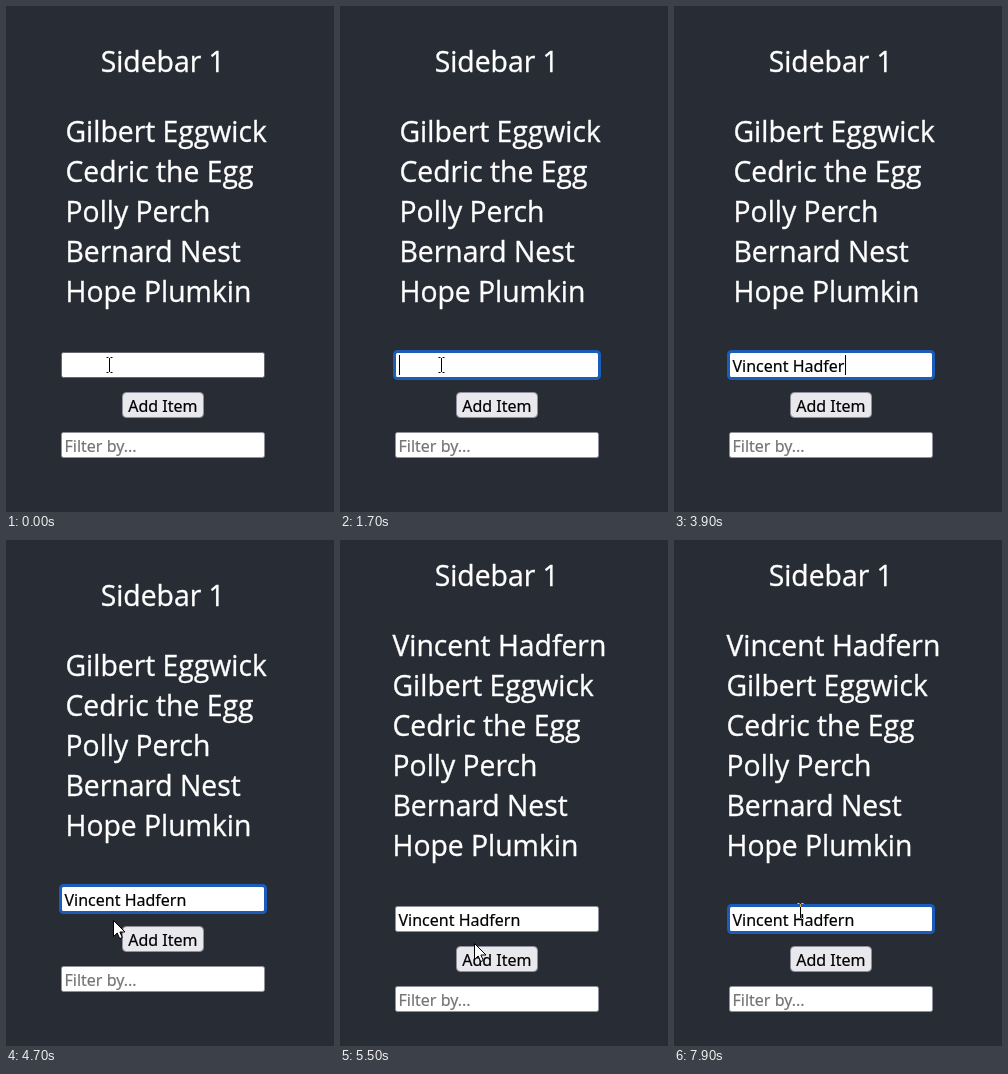
Animation, 328 px wide and 506 px high, one loop 8 s. Source, as an HTML page:

```html
<!DOCTYPE html>
<html lang="en">
<head>
<meta charset="utf-8">
<title>Sidebar</title>
<style>
  html, body { margin: 0; width: 100%; height: 100%; overflow: hidden; background: #282c34; }
  svg { display: block; width: 328px; height: 506px; isolation: isolate; }
  text { white-space: pre; stroke-width: .35px; }
  .large { font: 28.3px "Open Sans", "Noto Sans", sans-serif; fill: #fff; stroke: #fff; }
  .small { font: 16px "Noto Sans", "Open Sans", sans-serif; fill: #000; }
  .small text { stroke: #000; stroke-width: .2px; }
  .small .hint { fill: #757575; stroke: #757575; }
  .field { fill: #fff; stroke: #8f8f9d; }
  .beam { fill: none; stroke: #fff; mix-blend-mode: difference; }
</style>
</head>
<body>
<svg viewBox="0 0 328 506">
  <rect width="328" height="506" fill="#282c34"/>
  <text id="title" class="large" x="94.7" y="66">Sidebar 1</text>
  <g id="list" class="large"></g>
  <g id="form" class="small">
    <rect id="field" class="field" x="55.5" y="346.5" width="203" height="25" rx="2"/>
    <rect id="ring" x="54.5" y="345.5" width="205" height="27" rx="3" fill="#fff" stroke="#1a5cb8" stroke-width="3"/>
    <text id="entry" x="58.5" y="365.5"></text>
    <rect id="caret" y="349" width="1" height="20"/>
    <rect id="button" x="116.5" y="386.5" width="81" height="25" rx="4" stroke="#8f8f9d"/>
    <text x="122.3" y="405.5">Add Item</text>
    <rect class="field" x="55.5" y="426.5" width="203" height="25" rx="2"/>
    <text class="hint" x="58.5" y="445.5">Filter by...</text>
  </g>
  <path id="beam" class="beam" d="M-2.5-7.5h2M1.5-7.5h2M.5-7V7M-2.5 7.5h2M1.5 7.5h2"/>
  <path id="arrow" d="M.5.5V16.5L4.2 13l2.5 5.6 2.6-1.1L6.9 12H12Z" fill="#fff" stroke="#000"/>
</svg>
<script>
const LOOP = 8000, STEP = 100, BLINK = 530;
const NEW_NAME = "Vincent Hadfern";
const NAMES = ["Gilbert Eggwick", "Cedric the Egg", "Polly Perch", "Bernard Nest", "Hope Plumkin"];
const FOCUS = 500, HIDE = 2100, SHOW = 4300, PRESS = 5400, ADD = 5500, REFOCUS = 7100;

// time, x, y of the pointer's hot spot
const ROUTE = [
  [0, 103, 359], [300, 103, 359], [600, 101, 359], [4300, 101, 359],
  [4700, 107, 380], [5200, 134, 403], [5900, 134, 403], [6500, 126, 371]
];

const $ = id => document.getElementById(id);
const show = (el, on) => el.setAttribute("visibility", on ? "visible" : "hidden");
const moveTo = (el, x, y) => el.setAttribute("transform", `translate(${x} ${y})`);
const keyTime = i => i < 8 ? HIDE + i * 120 : 3200 + (i - 8) * 120;

const rows = [NEW_NAME, ...NAMES].map((name, i) => {
  const row = document.createElementNS("http://www.w3.org/2000/svg", "text");
  row.textContent = name;
  row.setAttribute("y", 96 + i * 40);
  return $("list").appendChild(row);
});

function pointerAt(t) {
  const next = ROUTE.findIndex(p => p[0] > t);
  if (next < 0) return ROUTE[ROUTE.length - 1].slice(1);
  const [t0, x0, y0] = ROUTE[next - 1], [t1, x1, y1] = ROUTE[next];
  const u = (t - t0) / (t1 - t0), k = u * u * (3 - 2 * u);
  return [x0 + (x1 - x0) * k, y0 + (y1 - y0) * k].map(Math.round);
}

function caretX(chars) {
  return 59 + (chars ? $("entry").getSubStringLength(0, chars) : 0);
}

function draw(t) {
  const added = t >= ADD, shift = added ? 20 : 0;
  moveTo($("title"), 0, -shift);
  moveTo($("list"), added ? 52.5 : 59.5, shift);
  show(rows[0], added);
  moveTo($("form"), 0, shift);

  const typed = [...NEW_NAME].filter((_, i) => t >= keyTime(i)).length;
  $("entry").textContent = NEW_NAME.slice(0, typed);

  const focused = (t >= FOCUS && t < PRESS) || t >= REFOCUS;
  const blinkStart = t >= REFOCUS ? REFOCUS : typed ? keyTime(typed - 1) : FOCUS;
  show($("ring"), focused);
  show($("caret"), focused && Math.floor((t - blinkStart) / BLINK) % 2 === 0);
  $("caret").setAttribute("x", Math.round(caretX(t >= REFOCUS ? 9 : typed)));

  const [x, y] = pointerAt(t);
  const within = (left, top, w, h) => x >= left && x <= left + w && y >= top + shift && y <= top + shift + h;
  const visible = t < HIDE || t >= SHOW;
  const inField = within(55, 346, 204, 26);
  const onButton = within(116, 386, 82, 26);
  $("field").style.stroke = inField ? "#676774" : "";
  $("button").setAttribute("fill", !onButton ? "#e9e9ed" : t >= PRESS ? "#b1b1b9" : "#d0d0d7");
  moveTo($("beam"), x, y);
  moveTo($("arrow"), x, y);
  show($("beam"), visible && inField);
  show($("arrow"), visible && !inField);
}

const start = performance.now();
function tick() {
  const t = (performance.now() - start) % LOOP;
  draw(Math.floor(t / STEP) * STEP);
  requestAnimationFrame(tick);
}
tick();
</script>
</body>
</html>
```
